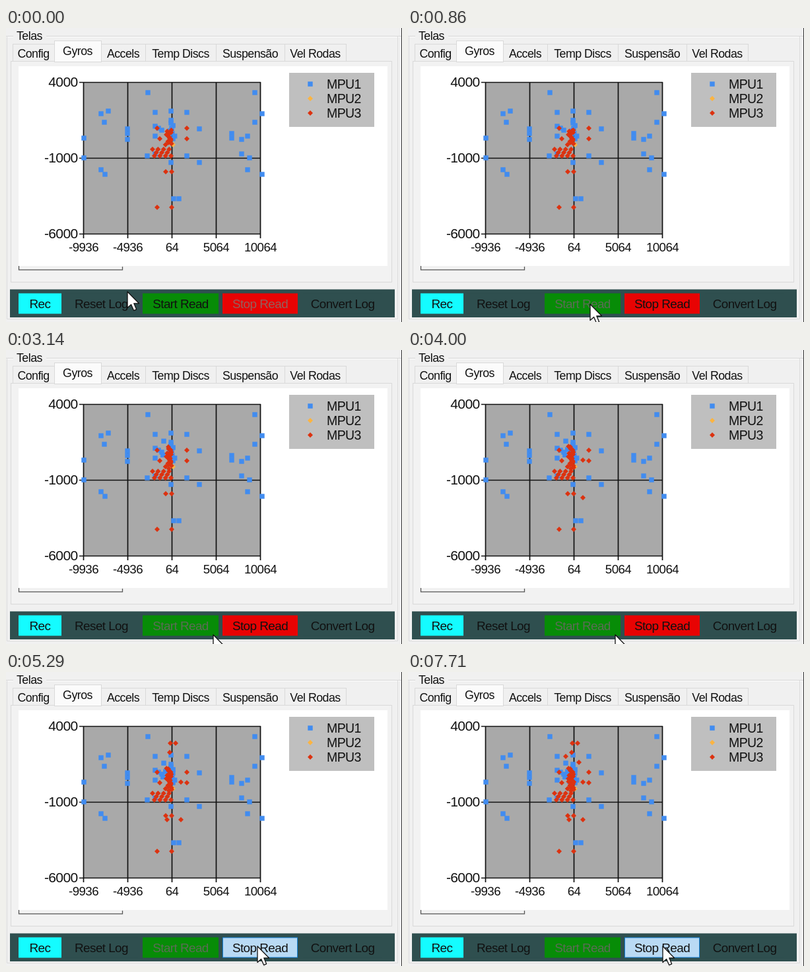
An HTML page for the animation above (8 s loop, 600x446 px).

```html
<!DOCTYPE html>
<html lang="pt">
<head>
<meta charset="utf-8">
<title>Telas</title>
<style>
html, body { margin: 0; width: 100%; height: 100%; overflow: hidden; background: #f0f0f0; }
svg { display: block; width: 600px; height: 446px; }
text { font-family: "Liberation Sans", Arial, sans-serif; letter-spacing: -.03em; fill: #111; white-space: pre; }
</style>
</head>
<body>
<svg id="stage" viewBox="0 0 600 446" xmlns="http://www.w3.org/2000/svg"></svg>
<script>
const stage = document.getElementById('stage');
const LOOP = 8000, STEPS_PER_SECOND = 7, READ_STEP = 5, LAST_STEP = 55;
const BLUE = '#418cf0', ORANGE = '#fcb441', RED = '#dc3210';
const FACE = '#f0f0f0', PAGE = '#fbfbfb', EDGE = '#d9d9d9';
const UI_SIZE = 17.8, BUTTON_SIZE = 18.9, AXIS_SIZE = 18.7;

function add(tag, attrs, content) {
  const node = document.createElementNS('http://www.w3.org/2000/svg', tag);
  for (const key in attrs) node.setAttribute(key, attrs[key]);
  if (content) node.textContent = content;
  return stage.appendChild(node);
}
const rect = (x, y, width, height, fill, stroke = 'none') =>
  add('rect', { x, y, width, height, fill, stroke });
const line = (d, stroke, width = 1) => add('path', { d, stroke, 'stroke-width': width, fill: 'none' });
const label = (x, y, size, content, anchor = 'start') =>
  add('text', { x, y, 'font-size': size, 'text-anchor': anchor }, content);
const square = (x, y) => rect(x - 3.7, y - 3.7, 7.4, 7.4, BLUE);
const diamond = (x, y, fill = RED) => add('path', { d: `M${x} ${y - 4}l4 4-4 4-4-4z`, fill });

let seed = 12;
function random() {
  seed = (seed * 16807) % 2147483647;
  return seed / 2147483647;
}
const spread = (center, reach) => center + (random() + random() - 1) * reach;

// Group box and tabs
rect(0, 0, 600, 446, FACE);
rect(599, 0, 1, 446, '#333');
line('M0 12.5H11M61 12.5H599', '#d5d5d5');
line('M0 13.5H11M61 13.5H599', '#fff');
line('M1.5 12V441.5H593.5V13', '#dcdcdc');
label(16, 18, UI_SIZE, 'Telas');
rect(7.5, 50.5, 577, 335, '#f2f2f2', EDGE);

let tabX = 10;
for (const [name, width] of [['Config', 63], ['Gyros', 71], ['Accels', 67],
  ['Temp Discs', 107], ['Suspensão', 104], ['Vel Rodas', 93]]) {
  const active = name === 'Gyros';
  rect(tabX + .5, active ? 19.5 : 24.5, width, active ? 32 : 26, active ? PAGE : FACE, EDGE);
  label(tabX + width / 2, active ? 41 : 45, UI_SIZE, name, 'middle');
  tabX += width;
}

// Chart
rect(19, 58, 559, 303, '#fff');
line('M19.5 361V366.8H176.5V362', '#555', 1.3);
rect(118, 82, 268, 231, '#a9a9a9');
for (let i = 0; i < 5; i++) {
  const x = 117.5 + i * 67;
  line(`M${x} 82V319`, '#111', 1.7);
  label(x, 339, AXIS_SIZE, String(i * 5000 - 9936), 'middle');
}
for (let i = 0; i < 3; i++) {
  const y = 82.5 + i * 115;
  line(`M111 ${y}H386`, '#111', 1.7);
  label(108.5, y + 6.5, 21, String(4000 - i * 5000), 'end');
}

rect(429, 68, 129, 82, '#bfbfbf');
square(461, 85);
diamond(461, 107, ORANGE);
diamond(461, 129);
for (let i = 0; i < 3; i++) label(486, 92 + i * 22, 19.5, `MPU${i + 1}`);

// Readings repeat at the same height on both swings: [y, left, right]
const pair = draw => ([y, left, right]) => { draw(left, y); draw(right, y); };
const late = [];
const reveal = (step, node) => late.push({ step, node });

[[98, 215, 377], [130, 144, 388], [143, 149, 377], [167, 118, 342], [197, 118, 369],
  [215, 144, 366], [222, 150, 388], [126, 155, 250], [128, 226, 274], [160, 184, 342],
  [153, 184, 293], [169, 184, 357], [164, 226, 366], [191, 226, 357], [194, 214, 274],
  [204, 250, 293], [259, 254, 262]].forEach(pair(square));
for (let i = 0; i < 8; i++) square(spread(253, 7), 140 + i * 4);
for (let i = 0; i < 3; i++) square(226 + i * 5, 149 + i * 3);
for (let i = 0; i < 6; i++) reveal(11 + i * 8, square(spread(248, 12), spread(152, 18)));

diamond(253, 177, ORANGE);

[[152, 229, 274], [168, 233, 274], [218, 242, 251], [272, 229, 251]].forEach(pair(diamond));
for (let i = 0; i < 11; i++) diamond(222 + i * 2.8, 184 + (i * 2 % 3) * 5);
for (let i = 0; i < 14; i++) diamond(spread(246, 6), 155 + i * 1.7);
for (let i = 0; i < 14; i++) reveal(6 + i * 3.5, diamond(spread(247, 6), spread(166, 26)));

// Wide readings that arrive later: [step, x, y]
[[14, 246, 147], [28, 265, 167], [28, 265, 224], [32, 257, 108], [33, 249, 108],
  [35, 248, 122], [36, 244, 224], [51, 239, 128], [52, 259, 137]]
  .forEach(([step, x, y]) => reveal(step, diamond(x, y)));

// Buttons
rect(6, 396.5, 583, 42.5, '#2f4f4f');
function button(x, width, content, fill, disabledInk) {
  const box = rect(x + .5, 403, width - 1, 30, fill, fill);
  const text = label(x + width / 2, 425, BUTTON_SIZE, content, 'middle');
  return {
    covers: (px, py) => px >= x && px <= x + width && py >= 403 && py <= 433,
    paint(hover, enabled) {
      box.setAttribute('fill', hover ? '#b9daf4' : fill);
      box.setAttribute('stroke', hover ? '#1681d8' : fill);
      text.style.fill = enabled ? '#111' : disabledInk;
    },
  };
}
button(19, 65, 'Rec', '#14fcff');
button(89, 111, 'Reset Log', '#2f4f4f');
button(450, 120, 'Convert Log', '#2f4f4f');
const start = button(207, 115, 'Start Read', '#078c07', '#5b6d55');
const stop = button(328, 114, 'Stop Read', '#e80303', '#94605c');

const cursor = add('path', {
  d: 'M0 0V24.5L5.6 19.4 9.6 28.6 13.6 26.8 9.8 17.8H17.5Z',
  fill: '#fff', stroke: '#111', 'stroke-width': 1.3, 'stroke-linejoin': 'round',
});

// Pointer moves: [first step, last step, x, y]
const moves = [[0, 6, 276, 419], [15, 19, 297, 420], [20, 22, 314, 432],
  [30, 37, 381, 416], [38, 39, 382, 416], [50, 53, 386, 416]];

function pointerAt(step) {
  let x = 184, y = 400;
  for (const [from, to, toX, toY] of moves) {
    const f = Math.min(1, Math.max(0, (step - from) / (to - from)));
    x += (toX - x) * f;
    y += (toY - y) * f;
  }
  return [x, y];
}

function render(time) {
  const step = Math.min(LAST_STEP, Math.floor((time % LOOP + 4) * STEPS_PER_SECOND / 1000));
  const [x, y] = pointerAt(step);
  const reading = step >= READ_STEP;
  cursor.setAttribute('transform', `translate(${x} ${y})`);
  start.paint(!reading && start.covers(x, y), !reading);
  stop.paint(reading && stop.covers(x, y), reading);
  for (const item of late) item.node.style.display = step >= item.step ? '' : 'none';
}

const origin = performance.now();
function tick() {
  render(performance.now() - origin);
  requestAnimationFrame(tick);
}
tick();
</script>
</body>
</html>
```
